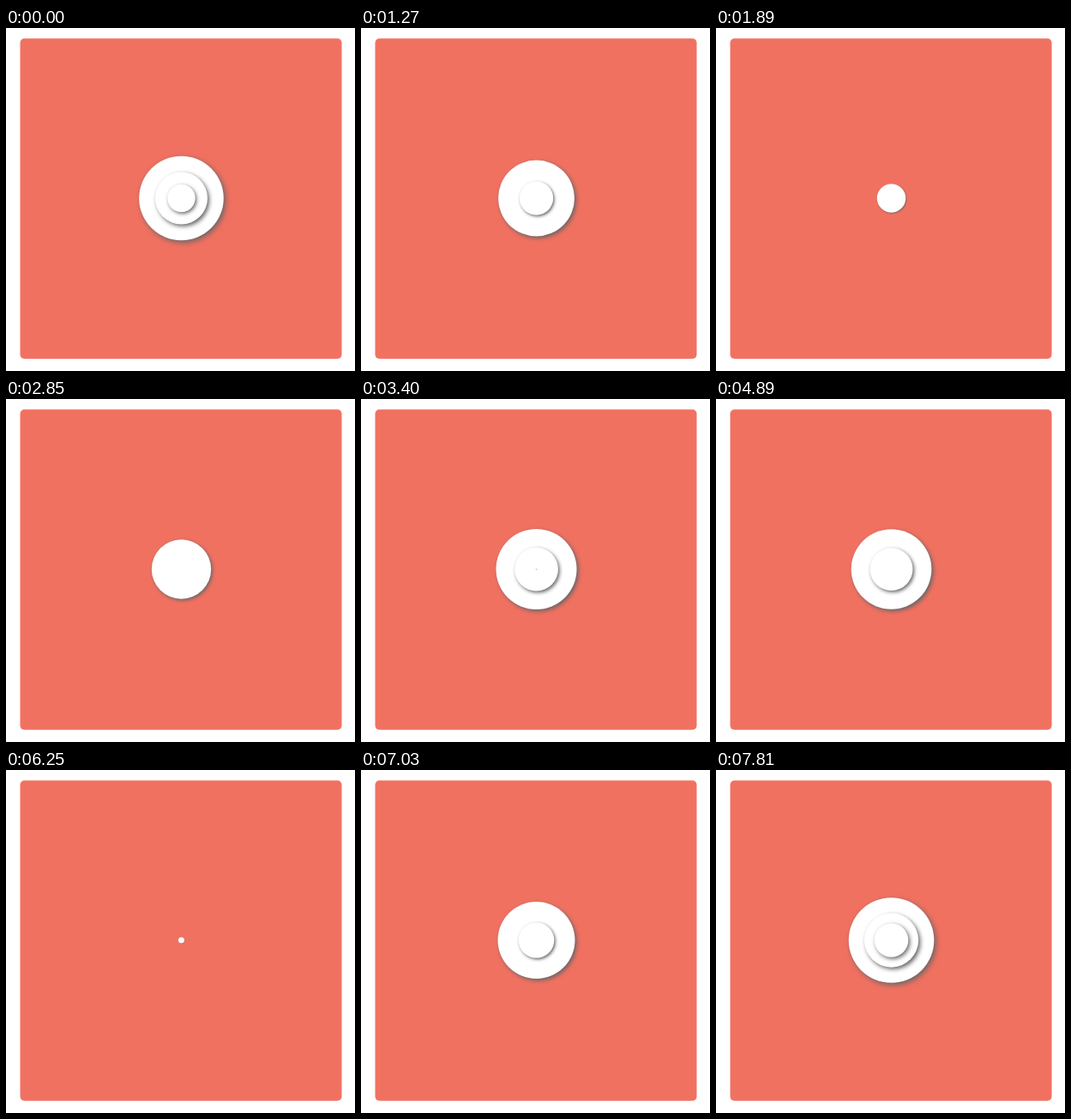
An HTML page with a canvas for the animation above (7890 ms loop, 407 by 401 pixels).

```html
<!DOCTYPE html>
<html lang="en">
<head>
<meta charset="utf-8">
<title>Pulsing discs</title>
<style>
  html, body { margin: 0; width: 100%; height: 100%; overflow: hidden; background: #fff; }
  canvas { display: block; }
</style>
</head>
<body>
<canvas id="stage" width="407" height="401"></canvas>
<script>
const ctx = document.getElementById('stage').getContext('2d');

const LOOP = 7890;
const PERIOD = 3800;
const START = 2395;   // first disc begins to grow
const PEAK = 1740;    // growth time before the motion runs backwards
const RATE = 0.0028;
const SOFT = 40;      // short ease-in, ms

const CENTER = { x: 204.5, y: 199 };
const DISCS = [
  { radius: 50.4, delay: 0 },
  { radius: 33, delay: 440 },
  { radius: 24.2, delay: 970 }
];

function growth(age) {
  if (age <= 0) return 0;
  const eased = age - SOFT * (1 - Math.exp(-age / SOFT));
  return 1 - Math.exp(-RATE * eased);
}

function drawCard() {
  ctx.fillStyle = '#f17161';
  ctx.beginPath();
  ctx.roundRect(16.5, 12.3, 375, 374.4, 5);
  ctx.fill();
}

function drawDisc(radius, scale) {
  const r = radius * scale;
  if (r < 0.3) return;
  ctx.save();
  ctx.shadowColor = '#666';
  ctx.shadowBlur = 6 * scale;
  ctx.shadowOffsetX = 2.3 * scale;
  ctx.shadowOffsetY = 2.5 * scale;
  ctx.fillStyle = '#fff';
  ctx.beginPath();
  ctx.arc(CENTER.x, CENTER.y, r, 0, Math.PI * 2);
  ctx.fill();
  ctx.restore();
}

function render(time) {
  const t = time % LOOP;
  const phase = (t - START + PERIOD) % PERIOD;
  const age = phase < PEAK ? phase : 2 * PEAK - phase;

  ctx.clearRect(0, 0, 407, 401);
  drawCard();
  for (const disc of DISCS) drawDisc(disc.radius, growth(age - disc.delay));
}

const begin = performance.now();
function tick() {
  render(performance.now() - begin);
  requestAnimationFrame(tick);
}
tick();
</script>
</body>
</html>
```
